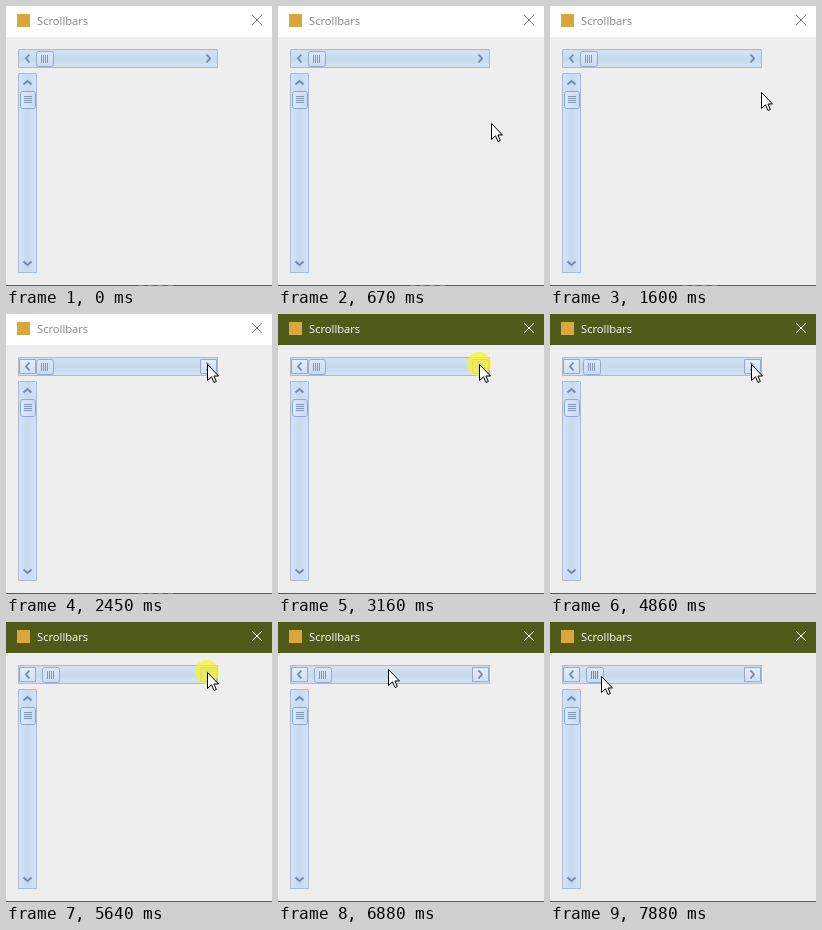
These frames come from a looping animation (266 px wide and 280 px high, 8000 ms). An HTML page with a canvas:

```html
<!DOCTYPE html>
<html lang="en">
<head>
<meta charset="utf-8">
<title>Scrollbars</title>
<style>
  html, body { margin: 0; width: 266px; height: 280px; overflow: hidden; }
  canvas { display: block; }
</style>
</head>
<body>
<canvas id="stage" width="266" height="280"></canvas>
<script>
const ctx = document.getElementById('stage').getContext('2d');
const LOOP = 8000;
const ACTIVATED = 3160;

// Pointer moves: start, end, number of positions, from x/y, to x/y
const moves = [
  [360, 900, 8, 237, 253, 208, 86],
  [1600, 2060, 7, 211, 86, 201, 61],
  [2380, 2450, 2, 201, 55, 201, 50],
  [6570, 6880, 5, 188, 50, 110, 47],
  [7110, 7880, 11, 107, 47, 51, 54],
];
// Mouse presses: down, up, thumb position afterwards
const presses = [
  [3160, 3790, 18],
  [4090, 4320, 20],
  [4550, 4860, 21],
  [5090, 5410, 23],
  [5640, 6020, 24],
];
const arrow = new Path2D('M.5 .5V16.5L4.5 12.8L7 18.5L9.3 17.5L6.9 12H11.5Z');

function pointerAt(t) {
  const move = moves.findLast(m => t >= m[0]);
  if (!move) return null;
  const [start, end, count, x0, y0, x1, y1] = move;
  const step = Math.min(count - 1, Math.floor((t - start) / (end - start) * (count - 1) + 1e-6));
  const p = step / (count - 1);
  const ease = p * (2 - p);
  return { x: Math.round(x0 + (x1 - x0) * ease), y: Math.round(y0 + (y1 - y0) * ease) };
}

function rect(x, y, w, h, color) {
  ctx.fillStyle = color;
  ctx.fillRect(x, y, w, h);
}

function line(points, color, width = 1) {
  ctx.beginPath();
  points.forEach(([x, y]) => ctx.lineTo(x, y));
  ctx.strokeStyle = color;
  ctx.lineWidth = width;
  ctx.stroke();
}

function box(x, y, w, h, radius, stops, border) {
  const fill = ctx.createLinearGradient(0, y, 0, y + h);
  stops.forEach((color, i) => fill.addColorStop(i / (stops.length - 1), color));
  ctx.beginPath();
  ctx.roundRect(x + .5, y + .5, w - 1, h - 1, radius);
  ctx.fillStyle = fill;
  ctx.fill();
  ctx.strokeStyle = border;
  ctx.lineWidth = 1;
  ctx.stroke();
}

// Drawn lengthwise along x; the vertical bar swaps the axes
function scrollbar(thumb, hover, pressed, grip) {
  box(0, 0, 200, 19, 0, ['#d6e4f2', '#c6daee', '#d3e4f4'], '#a5bbd9');
  if (hover) {
    box(1, 2, 17, 15, 0, ['#e3edf7', '#d0e1f2'], '#91aacd');
    box(182, 2, 17, 15, 0, pressed ? ['#b5cce6', '#c3d8ee'] : ['#e3edf7', '#d0e1f2'], '#91aacd');
  }
  line([[11.5, 5.5], [8, 9.5], [11.5, 13.5]], '#7088b0', 1.8);
  line([[188.5, 5.5], [192, 9.5], [188.5, 13.5]], '#7088b0', 1.8);
  box(thumb, 2, 18, 16, 2, ['#dce8f5', '#c8dcf0'], '#91aacd');
  for (let i = 0; i < 4; i++) rect(thumb + 5 + 2 * i, 6, 1, 8, grip);
}

function draw(t) {
  const active = t >= ACTIVATED;
  const pointer = pointerAt(t);
  const hover = pointer && pointer.y < 62;
  const press = presses.findLast(p => t >= p[0]);
  const pressed = press && t < press[1];
  const thumb = press ? press[2] : 18;
  const overThumb = hover && pointer.x < 12 + thumb + 18;

  ctx.setTransform(1, 0, 0, 1, 0, 0);
  rect(0, 0, 266, 280, '#eeeeee');
  rect(0, 0, 266, 31, active ? '#505a1b' : '#ffffff');
  rect(0, 279, 266, 1, '#59623a');
  if (!active) for (let x = 132; x < 172; x += 10) rect(x, 279, 5, 1, '#8d7f9c');

  rect(11, 8, 13, 13, '#dca63e');
  ctx.font = '11.2px "Open Sans", sans-serif';
  ctx.fillStyle = active ? '#ffffff' : '#858585';
  ctx.fillText('Scrollbars', 31, 19);
  const cross = active ? '#ffffff' : '#777777';
  line([[246, 9], [256, 19]], cross);
  line([[256, 9], [246, 19]], cross);

  ctx.setTransform(1, 0, 0, 1, 12, 43);
  scrollbar(thumb, hover, pressed, overThumb ? '#6e86ae' : '#8296b6');
  ctx.setTransform(0, 1, 1, 0, 12, 67);
  scrollbar(18, false, false, '#8296b6');

  ctx.setTransform(1, 0, 0, 1, 0, 0);
  if (pressed) {
    ctx.beginPath();
    ctx.arc(201, 50, 12, 0, 2 * Math.PI);
    ctx.fillStyle = 'rgba(250, 244, 40, .74)';
    ctx.fill();
  }
  if (pointer) {
    ctx.translate(pointer.x, pointer.y);
    ctx.fillStyle = '#ffffff';
    ctx.fill(arrow);
    ctx.strokeStyle = '#000000';
    ctx.lineWidth = 1;
    ctx.stroke(arrow);
  }
}

const began = performance.now();
function frame() {
  draw((performance.now() - began) % LOOP);
  requestAnimationFrame(frame);
}
frame();
</script>
</body>
</html>
```
